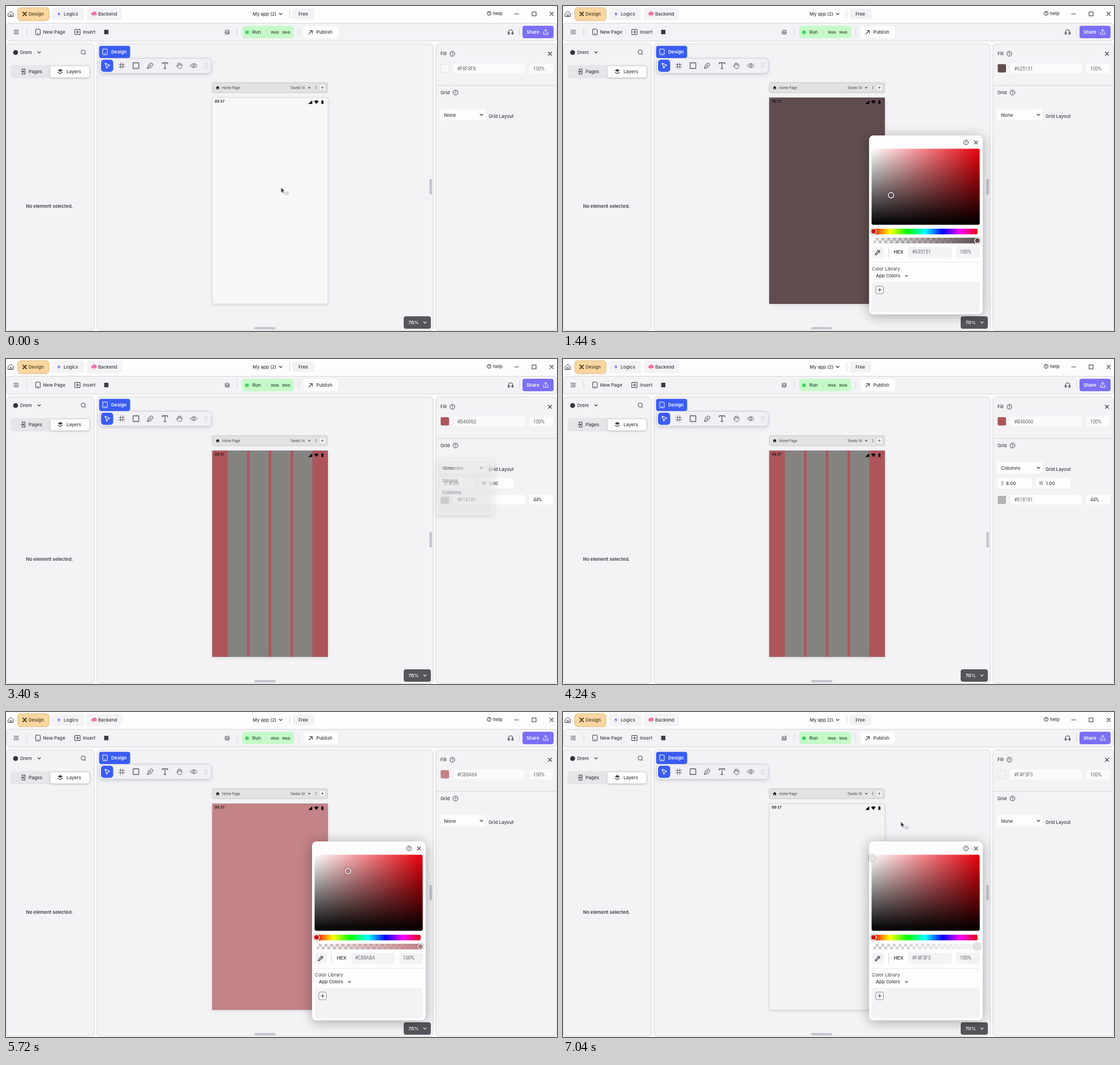
Recreate the animation shown at these times as an HTML page with a canvas. Size 974 by 575 pixels, loop 7080 ms.

```html
<!DOCTYPE html>
<html lang="en">
<head>
<meta charset="utf-8">
<title>App designer</title>
<style>
html, body { margin: 0; width: 974px; height: 575px; overflow: hidden; background: #fbfbfc; }
canvas { display: block; }
</style>
</head>
<body>
<canvas id="stage" width="974" height="575"></canvas>
<script>
const ctx = document.getElementById('stage').getContext('2d');
const LOOP = 7080;
const INK = '#3c3c44', PANEL = '#f3f3f6', EDGE = '#d6d6d8', BLUE = '#3a5cf5';
const PHONE = { x: 364.5, y: 162, w: 204.5, h: 365 };
const SV = { x: 545.5, y: 252.5, w: 191, h: 134.5 };

// time, saturation, value
const PICKS = [
  [760, 0, .973], [1440, .18, .388], [2000, .467, .706],
  [5480, .467, .706], [6040, .07, .902], [6480, .004, .957]
];
// time, x, y
const POINTER = [
  [60, 486, 321], [460, 775, 110], [2040, 640, 290], [2180, 730, 241],
  [2360, 808, 193], [6500, 546, 259], [7000, 597, 194]
];
// opens, closes, choice made
const MENUS = [[2440, 2760, 'Square'], [3000, 3340, 'Columns'], [4440, 4760, 'None']];
const PICKER = [[600, 2200], [5240, 9000]];

const clamp = v => Math.max(0, Math.min(1, v));
const ease = v => v * v * (3 - 2 * v);

function track(keys, t) {
  if (t <= keys[0][0]) return keys[0].slice(1);
  for (let i = 1; i < keys.length; i++) {
    const a = keys[i - 1], b = keys[i];
    if (t < b[0]) {
      const k = ease((t - a[0]) / (b[0] - a[0]));
      return [a[1] + (b[1] - a[1]) * k, a[2] + (b[2] - a[2]) * k];
    }
  }
  return keys[keys.length - 1].slice(1);
}

const fade = (t, from, to) => Math.min(clamp((t - from) / 120), 1 - clamp((t - to) / 120));

function box(x, y, w, h, r, fill, edge, shadow) {
  ctx.save();
  ctx.beginPath();
  ctx.roundRect(x, y, w, h, r);
  if (shadow) {
    ctx.shadowColor = shadow[0];
    ctx.shadowBlur = shadow[1];
    ctx.shadowOffsetY = shadow[2];
  }
  if (fill) { ctx.fillStyle = fill; ctx.fill(); }
  ctx.shadowColor = 'transparent';
  if (edge) { ctx.strokeStyle = edge; ctx.lineWidth = 1; ctx.stroke(); }
  ctx.restore();
}

function text(s, x, y, o = {}) {
  ctx.font = `${o.w || 500} ${o.size || 8.1}px ${o.font || 'Inter'}, sans-serif`;
  ctx.fillStyle = o.color || INK;
  ctx.fillText(s, x, y);
}

const value = (s, x, y, color = '#66666e') => text(s, x, y, { w: 400, size: 8.3, font: 'Roboto', color });

function path(d, x, y, color = INK, width = 1, fill) {
  ctx.save();
  ctx.translate(x, y);
  const p = new Path2D(d);
  if (fill) { ctx.fillStyle = fill; ctx.fill(p); }
  if (width) {
    ctx.strokeStyle = color;
    ctx.lineWidth = width;
    ctx.lineCap = ctx.lineJoin = 'round';
    ctx.stroke(p);
  }
  ctx.restore();
}

function dot(x, y, r, fill, edge, width = 1) {
  ctx.beginPath();
  ctx.arc(x, y, r, 0, 7);
  if (fill) { ctx.fillStyle = fill; ctx.fill(); }
  if (edge) { ctx.strokeStyle = edge; ctx.lineWidth = width; ctx.stroke(); }
}

const chevron = (x, y, s = 2.5) => path(`M${-s} ${-s / 2}L0 ${s / 2}L${s} ${-s / 2}`, x, y, INK, 1.1);
const cross = (x, y) => path('M-3 -3L3 3M3 -3L-3 3', x, y, INK, 1.1);
const rule = (x, y, h) => { ctx.fillStyle = '#d4d4da'; ctx.fillRect(x, y, 1, h); };

function help(x, y, r = 4.3) {
  dot(x, y, r, null, INK, 1);
  path('M-1.3 -1C-1.3 -2.8 1.5 -2.6 1.3 -.9C1.2 -.2 0 0 0 .9M0 2.1V2.2', x, y, INK, .9);
}

const phoneIcon = (x, y, c) => {
  path('M-3 -5H3Q4 -5 4 -4V4Q4 5 3 5H-3Q-4 5 -4 4V-4Q-4 -5 -3 -5ZM-1 3H1', x, y, c, 1);
};

function titleBar() {
  ctx.fillStyle = '#fdfdfd';
  ctx.fillRect(0, 0, 974, 30);
  path('M-4.5 -.5L0 -4.5L4.5 -.5V4.5H-4.5ZM-1.3 4.5V1H1.3V4.5', 8.5, 14, INK, 1);
  box(21, 3, 55, 22.5, 5, '#fad6a0', '#e9bd7e', ['rgba(150,100,30,.25)', 3, 1]);
  path('M-3 -3L3 3M3 -3L-3 3', 33, 14, '#503a1c', 1.8);
  text('Design', 40, 17, { color: '#4a3a20' });
  box(81, 3, 57, 22, 4, '#f3f3f5');
  path('M1 -4.5L-3 .8H0L-1 4.5L3 -1H0Z', 93.5, 14, INK, 0, '#7b68f5');
  text('Logics', 102, 17);
  box(142.5, 3, 62.5, 22, 4, '#f3f3f5');
  path('M-4.5 1Q-5 -2 -2.5 -2Q-1 -5 1.5 -3.5Q4.5 -3.5 4.5 1ZM-1.5 1V4M1.5 1V4', 155.5, 14, '#ee71a5', 1, '#ee71a5');
  text('Backend', 163, 17);
  text('My app (2)', 436, 17);
  chevron(485.5, 14);
  rule(501, 6, 16);
  box(507, 4.5, 38, 19, 4, '#f2f2f4');
  text('Free', 517, 17);
  help(854, 13, 3.5);
  text('help', 861, 15.8);
  path('M-3.5 0H3.5', 902.5, 14, INK, 1.1);
  path('M-3.5 -3.5H3.5V3.5H-3.5Z', 933.5, 14, INK, 1.1);
  cross(964.5, 14);
}

function toolBar() {
  box(.5, 30.5, 973, 31.5, 6, PANEL, EDGE);
  path('M-4 -3H4M-4 0H4M-4 3H4', 18, 46, INK, 1.1);
  rule(36, 39, 14);
  phoneIcon(56.5, 46, INK);
  text('New Page', 65.5, 49);
  path('M-4.5 -4.5H4.5V4.5H-4.5ZM0 -2.5V2.5M-2.5 0H2.5', 126.5, 46, INK, 1);
  text('Insert', 136, 49);
  box(173.5, 42, 7.5, 8, 1, INK);
  path('M-2.5 -1Q-2.5 -3.5 0 -3.5Q2.5 -3.5 2.5 -1V2Q2 4 0 4Q-2 4 -2.5 2ZM-4 -3L-2.5 -1.5M4 -3L2.5 -1.5M-4.5 .5H-2.5M4.5 .5H2.5M-4 4L-2.2 2.6M4 4L2.2 2.6M-1 0H1M-1 2H1', 391, 46, INK, .9);
  rule(408, 39, 14);
  box(417.5, 35, 91.5, 22, 5, '#c5fac8');
  dot(426, 46.5, 3.3, '#48cf66');
  text('Run', 435.5, 49, { color: '#264a30' });
  rule(460, 42, 9);
  text('Web', 468, 49, { size: 6.8, color: '#264a30' });
  text('Web', 488, 49, { size: 6.8, color: '#264a30' });
  rule(517, 39, 14);
  box(526, 35.5, 61, 21.5, 4, '#fff');
  path('M-3 3L3 -3M-2 -3H3V2', 538.5, 46.5, INK, 1.1);
  text('Publish', 548.5, 49);
  path('M-4 3V0A4 4 0 0 1 4 0V3M-4 1H-2V4H-4ZM4 1H2V4H4Z', 892, 46, INK, 1);
  rule(907, 39, 14);
  box(913, 35, 55, 22, 4, '#7b70f6');
  text('Share', 920, 49, { color: '#fff', w: 600 });
  path('M-4 0V4H4V0M0 1.5V-4.5M-2.2 -2.5L0 -4.7L2.2 -2.5', 954, 46, '#fff', 1);
}

function leftPanel() {
  box(.5, 67, 155.5, 507, 6, PANEL, EDGE);
  dot(17, 82.3, 4.3, '#33333a');
  text('Drem', 25, 85);
  chevron(58.5, 82);
  dot(136.5, 81.5, 3.8, null, INK, 1);
  path('M0 0L1.6 1.6', 139.3, 84.3, INK, 1);
  box(8, 104.5, 141, 23.5, 5, '#e6e6e9');
  box(78.5, 106.5, 69, 20, 4, '#fff', null, ['rgba(0,0,0,.22)', 4, 1]);
  path('M-2 -4.5H3V4.5H-2V2.5M-2 -4.5V-2.5M-4 0H1M-.5 -1.5L1 0L-.5 1.5', 30.5, 116, INK, 1.1);
  text('Pages', 40, 119.2);
  path('M0 -4.5L4.5 -2L0 .5L-4.5 -2Z', 96, 116, INK, 0, INK);
  path('M-4 .8L0 3L4 .8', 96, 116.5, INK, 1.2);
  text('Layers', 107, 119.2);
  text('No element selected.', 35.5, 357, { w: 600 });
}

function tools() {
  box(165.5, 92.5, 197.5, 26.5, 6, '#f0f0f5', '#cfcfd8', ['rgba(60,60,120,.22)', 6, 2]);
  box(164.5, 70.5, 55, 21.5, 4, BLUE);
  phoneIcon(175, 81.2, '#fff');
  text('Design', 186, 84.2, { color: '#fff', w: 600 });
  box(168, 95, 21.5, 21.5, 5, BLUE);
  path('M-4 -4.5L4.5 -1L.8 .6L-.7 4.5Z', 179, 105.8, '#fff', 1.1);
  const c = '#5a5a62';
  path('M-2 -5V5M2 -5V5M-5 -2H5M-5 2H5', 204.5, 105.5, c, .9);
  path('M-5 -5H5V5H-5Z', 229.7, 105.5, c, 1.3);
  path('M-5 5L-3 -2L2 -5L5 -2L2 3ZM-5 5L0 0M2 -5L5 -2', 255, 105.5, c, 1);
  dot(255.3, 105.2, 1.1, null, c, .9);
  path('M-4.8 -3V-5H4.8V-3M0 -5V5M-1.8 5H1.8', 281, 105.5, c, 1.3);
  path('M-3 1V-3Q-2 -4.5 -1.2 -3V-4.2Q0 -6 1 -4.2V-3Q2 -4.4 3 -3V-1.5Q4 -2.5 4.7 -1.5V2Q4 5.5 .5 5.5Q-2 5.5 -3.5 3L-5 .5Q-4.5 -1 -3 1M-1.2 -3V0M1 -3V0M3 -2V0', 306.5, 105.3, c, .9);
  path('M-6 0Q0 -7.5 6 0Q0 7.5 -6 0Z', 332, 105.5, c, 1);
  dot(332, 105.5, 1.9, null, c, 1);
  for (let i = 0; i < 6; i++) dot(351.3 + i % 2 * 3.6, 102 + (i >> 1) * 3.6, .8, '#aaaab2');
}

function drawGrid(kind) {
  const { x, y, w, h } = PHONE;
  ctx.save();
  if (kind === 'Columns') {
    ctx.fillStyle = '#858380';
    for (let i = 0; i < 4; i++) ctx.fillRect(392 + i * 38.5, y, 34, h);
  } else if (kind === 'Square') {
    ctx.fillStyle = 'rgba(129,129,129,.44)';
    const step = 8 * w / 390;
    for (let i = step; i < w; i += step) ctx.fillRect(x + i, y, .55, h);
    for (let i = step; i < h; i += step) ctx.fillRect(x, y + i, w, .55);
  }
  ctx.restore();
}

function workArea(fill, grid) {
  box(161, 67, 594, 507, 6, PANEL, EDGE);
  tools();
  box(364.5, 135.5, 204, 18, 3, '#e2e2e3', '#cbcbcf');
  path('M-3.2 0L0 -3L3.2 0H2.3V3H.8V1H-.8V3H-2.3V0Z', 374.2, 144.5, INK, 0, '#111');
  text('Home Page', 382, 146.6, { size: 5.8, w: 400 });
  text('Tavelo 14', 502.5, 146.6, { size: 5.8, w: 400 });
  chevron(536, 144.5, 1.6);
  for (let i = -1; i < 2; i++) dot(547.8, 144.5 + i * 2.1, .65, INK);
  box(554, 139, 10.5, 10.5, 2, '#f7f7f8', '#d2d2d6');
  path('M-2 0H2M0 -2V2', 559.2, 144.3, INK, .8);

  box(PHONE.x, PHONE.y, PHONE.w, PHONE.h, 0, fill, 'rgba(110,110,120,.2)', ['rgba(0,0,0,.1)', 6, 2]);
  drawGrid(grid);
  text('09:37', 369, 171.3, { size: 6.1, w: 600, color: '#111' });
  path('M-3.5 3L3.5 -3.5V3Z', 537.8, 170.2, INK, 0, '#000');
  path('M-4 -1.5Q0 -4.8 4 -1.5L0 3.2Z', 548.7, 170, INK, 0, '#000');
  path('M-1.8 -2.5H-.8V-3.3H.8V-2.5H1.8V3.3H-1.8Z', 559.3, 170, INK, 0, '#000');

  box(748.5, 306, 4.5, 27.5, 2, '#c5c5ce');
  box(438.5, 568, 38, 4, 2, '#c5c5ce');
  box(703, 549, 48, 22, 4, '#55555b');
  text('70%', 711.5, 563, { color: '#fff', w: 600 });
  path('M-2.3 -1.1L0 1.1L2.3 -1.1', 740.5, 560, '#fff', 1.1);
}

function checker(x, y, cols, rows, s) {
  ctx.fillStyle = '#c9c9c9';
  for (let i = 0; i < cols; i++)
    for (let j = 0; j < rows; j++)
      if ((i + j) % 2) ctx.fillRect(x + i * s, y + j * s, s, s);
}

function rightPanel(fill, hex, grid, pressed) {
  box(760, 67, 213.5, 507, 6, PANEL, EDGE);
  text('Fill', 768, 87.3);
  help(789, 84.5);
  cross(961.5, 84.5);
  box(768.5, 103, 14.5, 14.5, 2, fill, 'rgba(0,0,0,.08)');
  box(791, 102, 126, 17, 3, '#fbfbfc');
  value(hex, 797.5, 113.5);
  box(925, 102, 42, 17, 3, '#fbfbfc');
  value('100%', 932, 113.5);
  ctx.fillStyle = EDGE;
  ctx.fillRect(760, 140, 214, 1);
  text('Grid', 768, 156);
  help(794.5, 153);
  box(768, 182.5, 80, 20, 3, pressed ? '#f1f1f3' : '#fdfdfd');
  text(grid, 774.5, 195.5);
  chevron(840.5, 192.5);
  text('Grid Layout', 853, 197.5);
  if (grid === 'None') return;
  box(768, 210.5, 61, 18.5, 3, '#fdfdfd');
  value('S', 774, 222.8);
  text('8.00', 783, 222.5);
  box(836, 210.5, 61, 18.5, 3, '#fdfdfd');
  value('W', 841.5, 222.8);
  text('1.00', 853.5, 222.5);
  box(768.5, 242, 14.5, 14.5, 2, '#e5e5e5');
  checker(768.5, 242, 4, 4, 3.6);
  box(768.5, 242, 14.5, 14.5, 2, 'rgba(129,129,129,.44)');
  box(791, 240.5, 126, 17, 3, '#fdfdfd');
  value('#818181', 797.5, 252.3);
  box(925, 240.5, 42, 17, 3, '#fdfdfd');
  value('44%', 932, 252.3, INK);
}

function menu(t) {
  const names = ['None', 'Square', 'Columns'];
  for (const [from, to, pick] of MENUS) {
    const a = fade(t, from, to);
    if (a <= 0) continue;
    ctx.save();
    ctx.globalAlpha = a;
    box(760.5, 176.5, 102, 100, 5, '#fbfbfc', null, ['rgba(0,0,0,.25)', 8, 2]);
    const hot = t > from + 160 ? names.indexOf(pick) : -1;
    names.forEach((n, i) => {
      if (i === hot) box(764, 184.5 + i * 21.7, 95, 17, 3, '#ececef');
      text(n, 771, 196 + i * 21.7);
    });
    ctx.restore();
  }
}

function gradient(x0, y0, x1, y1, ...stops) {
  const g = ctx.createLinearGradient(x0, y0, x1, y1);
  stops.forEach((c, i) => g.addColorStop(i / (stops.length - 1), c));
  return g;
}

function ring(x, y, fill) {
  ctx.save();
  ctx.shadowColor = 'rgba(0,0,0,.5)';
  ctx.shadowBlur = 3;
  dot(x, y, 4.8, fill, '#fff', 1.5);
  ctx.restore();
}

function picker(s, v, fill, rgb, hex, alpha) {
  ctx.save();
  ctx.globalAlpha = alpha;
  box(541, 229, 201, 316.5, 8, '#fdfdfe', null, ['rgba(0,0,0,.32)', 22, 3]);
  help(712.3, 241.3, 4.2);
  cross(730, 241.3);
  const { x, y, w, h } = SV;
  box(x, y, w, h, 3, gradient(x, 0, x + w, 0, '#fff', '#e8000b'));
  box(x, y, w, h, 3, gradient(0, y, 0, y + h, 'rgba(0,0,0,0)', '#000'));
  ring(x + s * w, y + (1 - v) * h, fill);

  box(547, 394, 186, 10, 3, gradient(547, 0, 733, 0, '#f00', '#ff0', '#0f0', '#0ff', '#00f', '#f0f', '#e8000b'));
  ring(549, 398.8, '#e8000b');
  ctx.save();
  ctx.beginPath();
  ctx.roundRect(549, 410, 184, 10, 3);
  ctx.clip();
  checker(548, 410, 38, 2, 5);
  ctx.fillStyle = gradient(549, 0, 733, 0, `rgba(${rgb},0)`, `rgba(${rgb},1)`);
  ctx.fillRect(549, 410, 184, 10);
  ctx.restore();
  ring(732.5, 415, fill);

  box(547, 426, 20, 19.5, 4, '#f3f3f5');
  path('M-4.5 4.5L-3.8 2L1 -2.8L2.8 -1L-2 3.8ZM0 -3.8L3.8 0M2 -2L4 -4', 556.5, 435.8, INK, 1.2);
  rule(575, 427, 18);
  text('HEX', 584.7, 438.3, { w: 600 });
  box(610, 426, 77, 19.5, 4, '#f3f3f5');
  value(hex, 617, 438);
  box(695, 426, 41.5, 19.5, 4, '#f3f3f5');
  value('100%', 701.5, 438);
  ctx.fillStyle = '#e9e9ec';
  ctx.fillRect(546, 453, 191, 1);
  text('Color Library', 546, 467.8, { w: 400 });
  text('App Colors', 553, 480.3);
  chevron(607, 477.5, 2.2);
  box(546, 488, 190.5, 54, 4, '#f3f3f5');
  box(553, 495.5, 13.5, 13.5, 3, '#fdfdfe', '#85858d');
  path('M-3 0H3M0 -3V3', 559.8, 502.2, INK, 1);
  ctx.restore();
}

function pointer(t, pickerAlpha) {
  const [x, y] = track(POINTER, t);
  const inArea = x > 162 && x < 754 && y > 67;
  const onPicker = pickerAlpha > 0 && x > 541 && x < 742 && y > 229;
  if (!inArea || onPicker || (t > 500 && t < 6500)) return;
  path('M0 0V9.5L2.3 7.4L3.9 11L5.6 10.2L4 6.8H7Z', x, y, '#fff', .8, '#35353b');
  box(x + 7.5, y + 8.5, 5.5, 4, 1, '#f4f4f4', '#a2a2a8');
}

function draw(t) {
  const [s, v] = track(PICKS, t);
  const hi = Math.round(v * 255), lo = Math.round(v * 255 * (1 - s));
  const hex = '#' + [hi, lo, lo].map(n => n.toString(16).padStart(2, '0')).join('').toUpperCase();
  const rgb = [hi - 15 * s, lo - 24 * s, lo - 10 * s].map(Math.round).join(',');
  const fill = `rgb(${rgb})`;
  let grid = 'None';
  for (const [, to, pick] of MENUS) if (t >= to - 20) grid = pick;
  const shown = Math.max(...PICKER.map(([from, to]) => fade(t, from, to)));

  ctx.fillStyle = '#fbfbfc';
  ctx.fillRect(0, 0, 974, 575);
  titleBar();
  toolBar();
  leftPanel();
  workArea(fill, grid);
  rightPanel(fill, hex, grid, t > 2360 && t < 2480);
  menu(t);
  if (shown > 0) picker(s, v, fill, rgb, hex, shown);
  pointer(t, shown);
}

let start;
function tick(now) {
  if (start === undefined) start = now;
  draw((now - start) % LOOP);
  requestAnimationFrame(tick);
}
requestAnimationFrame(tick);
</script>
</body>
</html>
```
